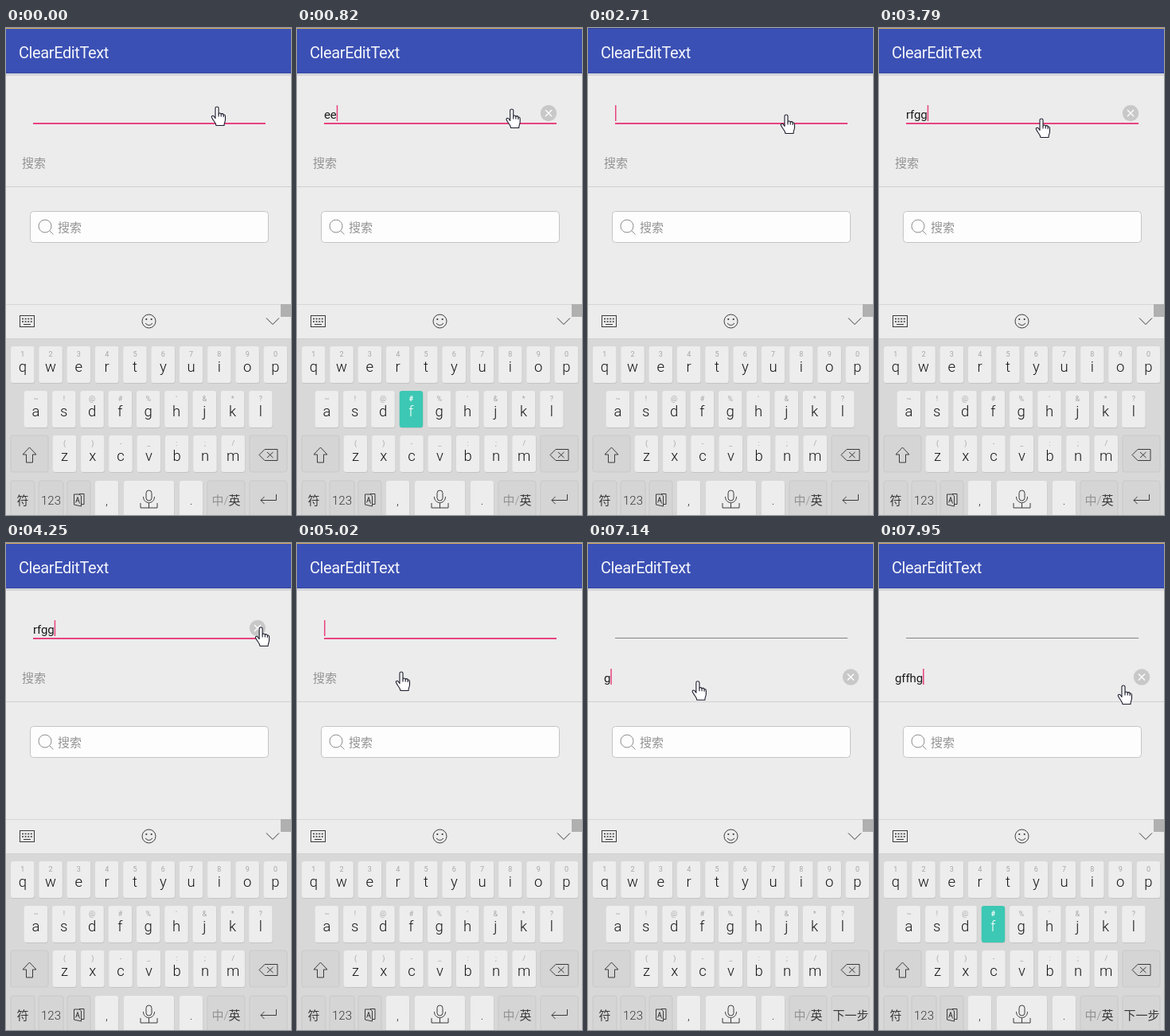
Animation, 358 px wide and 612 px high, one loop 8 s. Source, as an HTML page:

```html
<!DOCTYPE html>
<html lang="zh">
<head>
<meta charset="utf-8">
<title>ClearEditText</title>
<style>
html, body { margin: 0; width: 100%; height: 100%; overflow: hidden; background: #ececec; }
svg { display: block; width: 100vw; height: 100vh; }
text { font: 15px Roboto, "Noto Sans CJK SC", "Noto Sans CJK", sans-serif; white-space: pre; }
.title { font-size: 20px; letter-spacing: -.4px; fill: #f4f5fb; }
.hint { fill: #949494; }
.input { letter-spacing: -.1px; fill: #1a1a1a; }
.letter { font-size: 18.5px; font-weight: 300; text-anchor: middle; fill: #161616; }
.alt { font-size: 9px; text-anchor: middle; fill: #a6a6a6; }
.label { font-weight: 300; text-anchor: middle; fill: #383838; }
.line { fill: none; stroke: #3a3a3a; stroke-width: 1; }
.key { fill: #ededed; }
.dark { fill: #d5d5d5; stroke: #c6c6c6; stroke-width: .8; }
.down .key { fill: #3cc8b4; }
.down text { fill: #fff; }
.down .alt { font-weight: 700; }
</style>
</head>
<body>
<svg id="stage" viewBox="0 0 358 612">
  <rect width="358" height="612" fill="#ececec"/>
  <rect width="358" height="57" fill="#3b50b4"/>
  <rect y="56" width="358" height="1" fill="#3546a0"/>
  <rect y="57" width="358" height="3" fill="#d4d4da"/>
  <rect width="358" height="1" fill="#30409a"/>
  <rect id="strip" width="358" height="1" fill="#dcae52"/>
  <text class="title" x="16" y="38">ClearEditText</text>

  <rect id="underline" x="34" y="119" width="292"/>
  <text id="first" class="input" x="34" y="113.5"/>
  <text id="hint" class="hint" x="20" y="175">搜索</text>
  <text id="second" class="input" x="20" y="175"/>
  <rect y="199" width="358" height="1" fill="#d0d0d0"/>
  <rect id="caret" width="1.5" height="20" fill="#e8437f"/>
  <g id="clear">
    <circle r="10.2" fill="#c8c8c8"/>
    <path d="M-4-4 4 4M4-4-4 4" stroke="#fff" stroke-width="1.4"/>
  </g>

  <rect x="30.5" y="230.5" width="299" height="39" rx="4" fill="#fdfdfd" stroke="#c4c4c4"/>
  <g fill="none" stroke="#8e8e8e">
    <circle cx="49" cy="249" r="8"/><path d="M54.7 254.7 59.5 259.5"/>
  </g>
  <text class="hint" x="65" y="256">搜索</text>

  <rect y="347" width="358" height="1" fill="#d6d6d6"/>
  <rect y="390" width="358" height="222" fill="#d8d8d8"/>
  <rect y="390" width="358" height="1" fill="#d0d0d0"/>
  <g class="line">
    <rect x="17.5" y="361.5" width="18" height="14"/>
    <path d="M20 365.5H33M20 369H33" stroke-width="1.4" stroke-dasharray="2 1.6"/>
    <path d="M22 372.5H31"/>
    <circle cx="179.5" cy="368.5" r="8.5"/>
    <path d="M175 371Q179.5 376 184 371"/>
    <path d="M327 364.5 335 372.5 343 364.5"/>
  </g>
  <g fill="#333"><circle cx="176.3" cy="366" r="1.1"/><circle cx="182.7" cy="366" r="1.1"/></g>
  <rect x="345" y="347" width="15" height="16" fill="#b0b0b0"/>

  <g id="keys"></g>
  <g class="line">
    <path d="M29.5 527 38 536H33.5V546H25.5V536H21Z"/>
    <path d="M318 536.5 325 529.5H341V543.5H325ZM328 533 335.5 540M335.5 533 328 540"/>
    <path d="M85.5 586H92L94.5 588V601L85.5 599ZM92 585.5H98V598.5H94.5M87.5 596.5 90 589.5 92.5 597.5M88.5 594H91.5"/>
    <rect x="176" y="581" width="7" height="13" rx="3.5"/>
    <path d="M169 597V603H190V597M172.5 589C172.5 599 186.5 599 186.5 589M179.5 597V603"/>
    <path id="enter" d="M339.5 586V593.5H320M324.5 589 320 593.5 324.5 598"/>
  </g>
  <text id="next" class="label" x="330" y="598.5">下一步</text>

  <g id="hand" stroke="#1b1b2c" stroke-width="1.1" stroke-linejoin="round">
    <path fill="#fff" d="M-2 1.5C-2-.5 2-.5 2 1.5V9C2 7.5 5 7.5 5.2 9.5 6 8 8.2 8.4 8.2 10.5 9.2 9.5 10.5 10 10.5 12V16C10.5 19 9 19.5 9 23.5H-1C-1 20.5-4 18.5-6.5 13.5-7.5 11.5-5 10.5-3.8 12L-2 14.5Z"/>
    <path fill="none" d="M2 9V12.5M5.2 9.5V12.5M8.2 10.5V13"/>
  </g>
</svg>
<script>
const LOOP = 8000;
const $ = id => document.getElementById(id);
const show = (id, on) => $(id).setAttribute("visibility", on ? "visible" : "hidden");

function add(parent, tag, attrs, text = "") {
  const el = document.createElementNS("http://www.w3.org/2000/svg", tag);
  for (const k in attrs) el.setAttribute(k, attrs[k]);
  el.textContent = text;
  return parent.appendChild(el);
}

// Keyboard
const keys = {};
function plate(parent, x, y, w, cls) {
  const box = { width: w, height: 46, rx: 3 };
  if (cls === "key") add(parent, "rect", { x: x + .5, y: y + .9, ...box, fill: "#c4c4c4" });
  add(parent, "rect", { class: cls, x, y, ...box });
}
function letterRow(letters, alts, x0, y) {
  [...letters].forEach((c, i) => {
    const cx = x0 + 35.3 * i, g = add($("keys"), "g", {});
    plate(g, cx - 14.7, y, 29.4, "key");
    add(g, "text", { class: "alt", x: cx, y: y + 13 }, alts[i]);
    add(g, "text", { class: "letter", x: cx, y: y + 32 }, c);
    keys[c] = g;
  });
}
letterRow("qwertyuiop", "1234567890", 20.8, 400);
letterRow("asdfghjkl", "~!@#%'&*?", 37.5, 456);
letterRow("zxcvbnm", "()-_:;/", 73.5, 512);
for (const [x, y, w, cls, label] of [
  [6, 512, 47, "dark"], [306, 512, 47, "dark"],
  [6, 569, 30, "dark", "符"], [41, 569, 31, "dark", "123"], [77, 569, 29, "dark"],
  [112, 569, 29, "key", ","], [148, 569, 63, "key"], [218, 569, 29, "key", "."],
  [253, 569, 47, "dark"], [306, 569, 47, "dark"]
]) {
  plate($("keys"), x, y, w, cls);
  if (label) add($("keys"), "text", { class: "label", x: x + w / 2, y: 598.5 }, label);
}
const lang = add($("keys"), "text", { class: "label", x: 276.5, y: 598.5 });
add(lang, "tspan", { fill: "#929292" }, "中/");
add(lang, "tspan", {}, "英");

const spans = [[0, 1], [310, 7], [1250, 1], [1390, 1], [1540, 1], [1660, 5], [2290, 1], [2440, 2],
  [2710, 1], [2860, 4], [3400, 1], [3550, 2], [3790, 1], [3950, 3], [4380, 1], [4780, 2],
  [5020, 1], [5170, 3], [5530, 1], [5960, 2], [6200, 1], [6320, 1], [6470, 1], [6750, 7],
  [7710, 1], [7830, 1], [7950, 1], [LOOP, 1]];
const ticks = spans.slice(0, -1).flatMap(([a, n], i) =>
  Array.from({ length: n }, (_, j) => a + (spans[i + 1][0] - a) * j / n));
const last = (list, t, at = v => v[0]) => list.filter(v => at(v) <= t + .01).pop();

// [time, text, pressed key]
const typing = [[0, ""], [310, "", "e"], [440, "e", "e"], [575, "ee"], [710, "ee", "f"],
  [845, "eef", "f"], [980, "eeff"], [1110, "eeff", "d"], [1250, "eeffd", "d"], [1390, "eeffdd"],
  [1540, "eeffdd", "f"], [1660, "eeffddf"], [2160, ""], [2860, "", "r"], [2995, "r", "f"],
  [3130, "rf"], [3265, "rf", "g"], [3400, "rfg", "g"], [3550, "rfgg"], [4780, ""],
  [6880, "", "g"], [7020, "g"], [7160, "g", "f"], [7295, "gf", "f"], [7430, "gff"],
  [7570, "gff", "h"], [7710, "gffh", "g"], [7830, "gffhg"], [7950, "gffhg", "f"]];

// [time, x, y] of the fingertip
const path = [[0, 265, 99], [310, 265, 99], [1250, 276, 106], [1540, 276, 106], [1912, 316, 107],
  [2164, 316, 107], [2575, 249, 109], [2860, 249, 109], [3400, 204, 114], [3790, 204, 114],
  [4240, 321, 106], [4780, 321, 106], [5020, 131, 162], [5530, 71, 172], [6750, 71, 172],
  [7710, 305, 178], [7830, 307, 179], [LOOP, 307, 179]];

function handAt(t) {
  const i = Math.max(1, path.findIndex(p => p[0] > t));
  const [t0, x0, y0] = path[i - 1], [t1, x1, y1] = path[i];
  const k = (t - t0) / (t1 - t0);
  return [x0 + (x1 - x0) * k, y0 + (y1 - y0) * k];
}

const within = (t, a, b) => t >= a && t < b;

function draw(ms) {
  const t = last(ticks, ms, v => v);
  const [, text, pressed] = last(typing, t);
  const inSecond = t >= 6320;
  const field = $(inSecond ? "second" : "first");

  $("first").textContent = inSecond ? "" : text;
  $("second").textContent = inSecond ? text : "";
  show("hint", !(inSecond && text));
  show("clear", text);
  $("clear").setAttribute("transform", inSecond ? "translate(330 168.5)" : "translate(316 107)");

  const line = $("underline");
  line.setAttribute("height", inSecond ? 1 : 2);
  line.setAttribute("fill", inSecond ? "#858585" : "#e8437f");

  const width = text ? field.getComputedTextLength() : 0;
  $("caret").setAttribute("x", (inSecond ? 20 : 34) + width);
  $("caret").setAttribute("y", inSecond ? 158 : 97);
  show("caret", t >= 440 && !within(t, 5165, 5530));

  for (const c in keys) keys[c].setAttribute("class", c === pressed ? "down" : "");
  show("next", inSecond);
  show("enter", !inSecond);
  show("strip", !within(t, 2290, 2990) && !within(t, 5960, 6880));
  $("hand").setAttribute("transform", `translate(${handAt(t)})`);
}

const start = performance.now();
function loop() {
  draw((performance.now() - start) % LOOP);
  requestAnimationFrame(loop);
}
loop();
</script>
</body>
</html>
```
